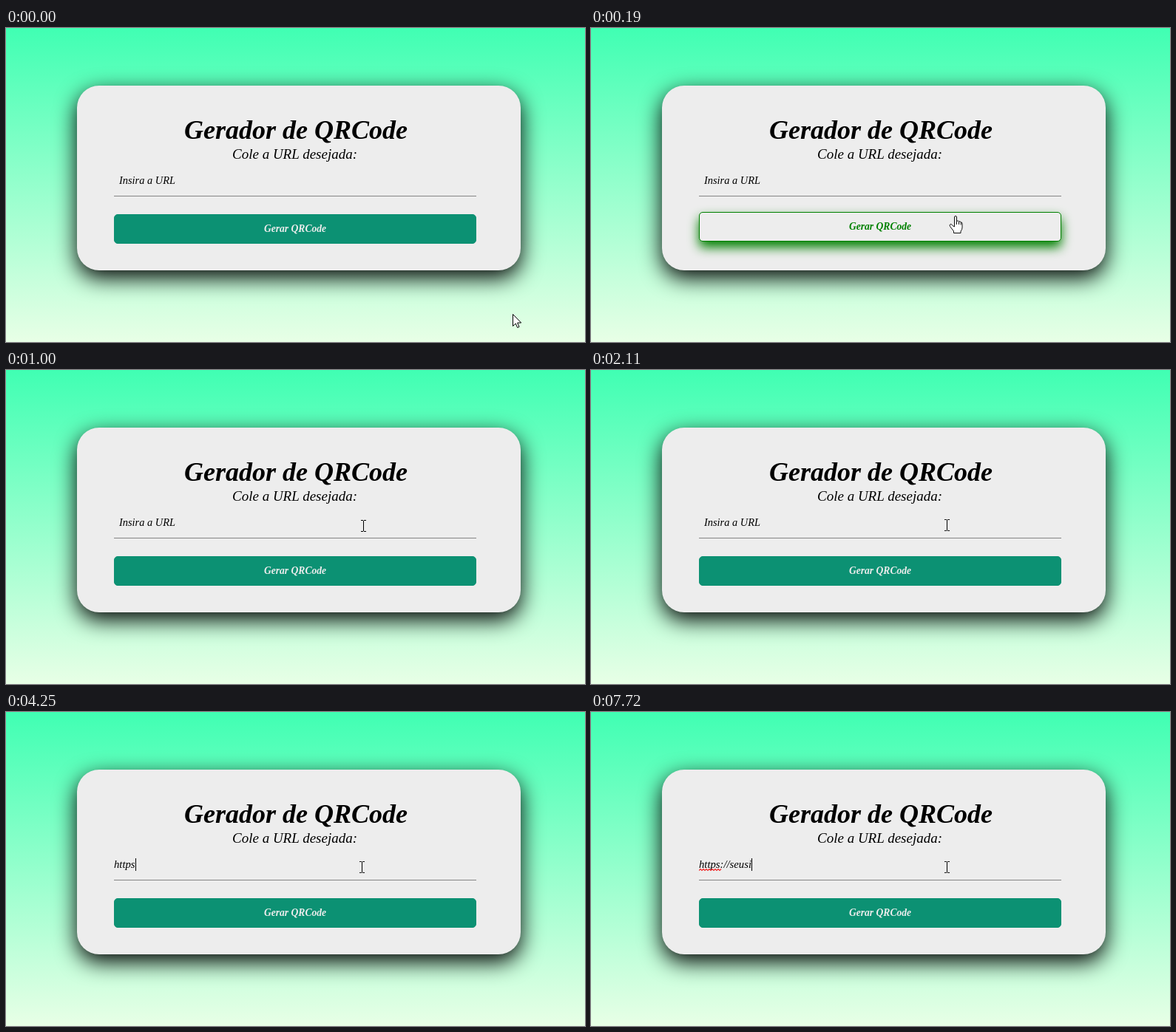
Write an HTML page that moves like this. It is 783 px wide and 425 px high and loops after 8 s.

```html
<!DOCTYPE html>
<html lang="pt-BR">
<head>
<meta charset="utf-8">
<title>Gerador de QRCode</title>
<style>
  html, body { margin: 0; width: 100%; height: 100%; overflow: hidden; }
  body {
    position: relative;
    background: linear-gradient(#40ffb3, #e8ffe6);
    font: italic 14.4px/1 "Liberation Serif", "Times New Roman", serif;
    color: #000;
  }
  body > * { position: absolute; margin: 0; white-space: nowrap; }
  .card {
    left: 96px; top: 78px; width: 600px; height: 250px;
    border-radius: 30px; background: #ededed;
    box-shadow: 0 10px 30px #000;
  }
  h1 { left: 241px; top: 119.8px; font-size: 36px; font-weight: bold; }
  .label { left: 306px; top: 161px; font-size: 19px; }
  .line { left: 146px; top: 227px; width: 490px; height: 1px; background: #858585; }
  #hint { left: 153px; top: 199px; }
  #field { left: 146px; top: 198.7px; height: 15px; font-size: 14.7px; }
  #caret { position: absolute; top: -.7px; width: 1px; height: 17px; background: #000; }
  #wave { left: 146px; top: 211px; }
  #button {
    left: 146px; top: 252px; width: 490px; height: 40px; box-sizing: border-box;
    border: 1px solid #0c9173; border-radius: 5px;
    background: #0c9173; color: #ededed;
    font-size: 13.6px; font-weight: bold; line-height: 38px; text-align: center;
  }
  #button.hover {
    transform: translateY(-3px);
    border-color: green; background: #ededed; color: green;
    box-shadow: 0 8px 15px green;
  }
  #pointer { left: 0; top: 0; overflow: visible; }
  #pointer g { display: none; }
</style>
</head>
<body>
  <div class="card"></div>
  <h1>Gerador de QRCode</h1>
  <p class="label">Cole a URL desejada:</p>
  <div class="line"></div>
  <p id="hint">Insira a URL</p>
  <div id="field"><span id="word"></span><i id="caret"></i></div>
  <svg id="wave" width="31" height="5">
    <path fill="none" stroke="#f02020" stroke-width="1.1"/>
  </svg>
  <div id="button">Gerar QRCode</div>
  <svg id="pointer" width="24" height="26">
    <g id="arrow">
      <path d="M.5.5V16.5L4.2 13L6.7 18.5L9 17.5L6.6 12H11.7Z" fill="#fff" stroke="#000"/>
    </g>
    <g id="hand">
      <path d="M-1.5 13V2Q-1.5.5 0 .5T1.5 2V7.5Q3.5 6 4.5 8Q6.5 7 7.2 9Q9 8.500 9 11V16Q9 19 7 21V23.500H-2.500V21L-7.500 14.500Q-8.500 12.500-7 11.500Q-5.500 11-4 13.500L-1.500 15Z"
        fill="#fff" stroke="#111"/>
      <path d="M1.500 7.500V12M4.500 8V12M7.200 9V12.500" fill="none" stroke="#111"/>
    </g>
    <g id="beam">
      <path d="M-3 .5H0M1 .5H4M-3 15.500H0M1 15.500H4M.5 1V15" fill="none" stroke="#000"/>
    </g>
  </svg>

<script>
const LOOP = 8000;
const URL_TEXT = "https://seusi";
const $ = id => document.getElementById(id);

// time, shape, x, y
const moves = [
  [0, "arrow", 685, 387],
  [70, "arrow", 585, 322],
  [120, "hand", 505, 265],
  [190, "hand", 493, 254],
  [260, "arrow", 487, 245],
  [330, "arrow", 485, 232],
  [400, "beam", 483, 212],
  [470, "beam", 483, 206],
  [530, "beam", 483, 204],
  [1000, "beam", 483, 203],
  [1520, "beam", 489, 206],
  [1650, "beam", 481, 202],
];

const keys = [2510, 3120, 3390, 3650, 4250, 4850, 5450, 5840, 6390, 7050, 7120, 7580, 7720];
const caretOff = [[2110, 2510], [3050, 3120], [4180, 4250], [4780, 4850], [5380, 5450], [6920, 7050]];
const FOCUS = 1650, SPELLCHECK = 5580;

let zigzag = "M0 3.500";
for (let x = 2; x <= 30; x += 2) zigzag += `L${x} ${x % 4 ? 1.5 : 3.5}`;
$("wave").firstElementChild.setAttribute("d", zigzag);

const show = (id, on) => $(id).style.display = on ? "block" : "none";

function draw(t) {
  const [, shape, x, y] = moves.findLast(m => m[0] <= t);
  for (const id of ["arrow", "hand", "beam"]) show(id, id === shape);
  $("pointer").style.transform = `translate(${x}px, ${y}px)`;
  $("button").classList.toggle("hover", shape === "hand");

  const typed = keys.filter(k => k <= t).length;
  $("word").textContent = URL_TEXT.slice(0, typed);
  $("caret").style.left = $("word").offsetWidth + "px";
  show("caret", t >= FOCUS && !caretOff.some(([from, to]) => t >= from && t < to));
  show("hint", !typed);
  show("wave", t >= SPELLCHECK);
}

const start = performance.now();
function tick(now) {
  draw(Math.max(0, now - start) % LOOP);
  requestAnimationFrame(tick);
}
draw(0);
requestAnimationFrame(tick);
</script>
</body>
</html>
```
